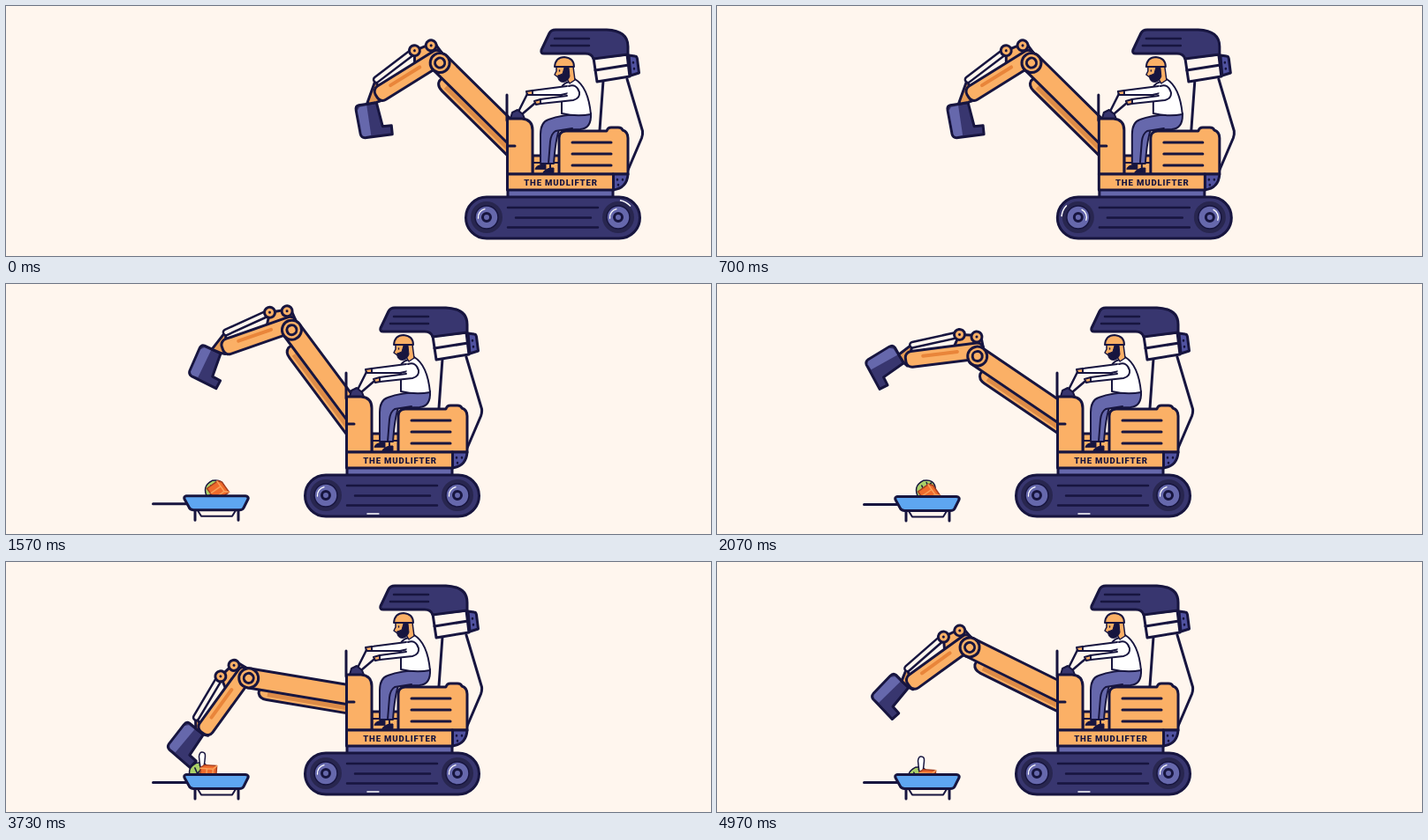
These frames come from a looping animation (798x284 px, 5130 ms). An HTML page:

```html
<!DOCTYPE html>
<html lang="en">
<head>
<meta charset="utf-8">
<title>Digger at the stove</title>
<style>
html, body { margin: 0; width: 100%; height: 100%; overflow: hidden; background: #fff6ee; }
svg { display: block; width: 798px; height: 284px; }
.o { fill: #fbb066; } .n { fill: #38366f; } .p { fill: #6668ac; } .w { fill: #fff6ee; }
.d { fill: #17153f; } .f { fill: none; } .m { fill: #5052a0; }
text { font: 900 9.6px Roboto, "Liberation Sans", sans-serif; letter-spacing: .85px; }
</style>
</head>
<body>
<svg viewBox="0 0 798 284" stroke="#17153f" stroke-width="3" stroke-linecap="round" stroke-linejoin="round">
  <g id="digger">
    <!-- boom, with its tip at the origin -->
    <g id="boom">
      <path fill="#fbb066" d="M14 10V15Q16 21 24 21H132V8H14Z"/>
      <path d="M24 15H132" stroke="#dd8b47" stroke-width="5" stroke-linecap="butt"/>
      <path class="o" d="M0 -11H132V11H0A11 11 0 0 1 0 -11Z"/>
    </g>
    <g id="bucket">
      <g transform="translate(-1.6 -2.5)">
        <path class="n" d="M-22 8L-2 5 5 32 15 31 16 41 -15 45Q-19 45 -20 41L-25 14Q-26 9 -22 8Z"/>
        <path class="p" stroke="none" d="M-21 10L-13 8.5 -8 42 -15 43.5Q-18 43 -18.5 41L-23.5 14Z"/>
      </g>
    </g>
    <!-- stick, running along its own x axis -->
    <g id="stick">
      <polygon id="link" fill="#e39a55"/>
      <path class="o" d="M-8 6L-7 20 0 24 17 27 25 14Z"/>
      <path class="f" d="M17 27L71 22" stroke-width="9"/>
      <path class="f" d="M17 27L71 22" stroke="#fff6ee" stroke-width="4"/>
      <rect class="o" x="-8" y="-3" width="89" height="18" rx="7"/>
      <path d="M22 8H61" stroke="#e9853a" stroke-width="4"/>
      <circle class="o" cx="17" cy="27" r="6"/><circle class="d" cx="17" cy="27" r="1.5" stroke="none"/>
      <circle class="o" cx="-2" cy="22" r="6"/><circle class="d" cx="-2" cy="22" r="1.5" stroke="none"/>
      <circle class="o" r="11"/><circle class="o" r="5.5"/>
    </g>

    <!-- cab and canopy -->
    <path class="f" d="M494 85L490 141M521 83L538.5 142Q539 146 537.5 150L520 191"/>
    <path class="w" d="M483 59L521 55 524 80 487 86Z"/>
    <path class="f" d="M485 73L523 67"/>
    <path class="m" d="M523 56L530 57Q532 57 532.5 60L534.5 76 525 79Z"/>
    <path class="n" d="M424 50L433 31Q435 27 440 27H498Q522 28 522 46V55L483 60Q481 54 474 54H427Q423 54 424 50Z"/>
    <path class="f" d="M439 37H478M435 45H478" stroke-width="2.5"/>
    <path class="f" d="M528 64V64.5M529 71V71.5" stroke-width="2.5"/>

    <path class="o" d="M414 170H446V191H414Z"/>
    <path class="f" d="M414 178H445" stroke-width="2"/>
    <path class="o" d="M444 191V150Q444 142 452 142H498Q499 138 503 138H511Q515 138 516 141Q522 143 522 150V191Z"/>
    <path class="f" d="M459 155H503M459 168H503M459 181H503"/>

    <!-- operator -->
    <g stroke-width="2">
      <path class="p" d="M480 122Q481 139 468 140L444 141Q440 152 438 179H429Q428 154 433 137L449 125Z"/>
      <path class="p" d="M472 123Q447 123 432 129Q423 132 423 146L423 179H432L434 154Q435 145 440 142L459 139"/>
      <path class="o" d="M425 179V183M434 179V185"/>
      <path class="d" d="M417 185Q418 181 426 180H429V185ZM426 189Q428 185 435 184H438V189Z" stroke-width="1"/>
      <path fill="#fff" d="M447 92Q450 87 456 86L462 83Q477 92 480 123Q464 126 447 122Z"/>
      <path fill="#fff" d="M453 91L414 96V101L446 101 455 99"/>
      <path fill="#fff" d="M455 91Q464 88 467 98Q468 105 460 107L423 111V106L453 102"/>
      <path class="o" d="M414 96L407 97 408 101 414 101ZM423 106L416 108 418 112 423 111Z"/>
      <path class="f" d="M408 100L397 122M416 111L402 123" stroke-width="2.5"/>
      <path class="o" d="M441 69V74L439 78 443 81H452L456 88 462 84 460 69Z" stroke-width="1.5"/>
      <path class="d" d="M443 79L448 77 450 70H455L456 80Q453 88 446 86Q442 84 443 79Z" stroke-width="1"/>
      <path class="o" d="M439 69Q440 58 450 58Q461 59 461 69Z"/>
      <path class="f" d="M444.5 73V74" stroke-width="1.5"/>
    </g>
    <path class="n" d="M389 128L391 121 397 118 403 123 405 128Z" stroke-width="2"/>
    <path class="o" d="M385.5 191V128H402Q414 129 414 141V191Z"/>
    <path class="f" d="M385 101V130M386 159H394"/>

    <!-- chassis -->
    <path class="m" d="M505 191H522Q521 207 505 209Z"/>
    <path class="f" d="M510 197V197.5M516 197V197.5M511 203V203.5" stroke-width="2.5"/>
    <rect class="p" x="386" y="208" width="119" height="10"/>
    <rect class="o" x="385.5" y="191" width="120" height="18"/>
    <text class="d" x="446" y="203.8" text-anchor="middle" stroke="none">THE MUDLIFTER</text>
    <rect class="n" x="338.5" y="217" width="197" height="47" rx="23.5"/>
    <path class="f" d="M386 229H488M395 240.5H480M386 251.5H488" stroke-width="2.5"/>
    <g id="wheels"></g>
    <path id="glint" class="f" stroke="#fff" stroke-width="1.5" stroke-linecap="butt"
      d="M511 220.5H362A20.3 20.3 0 0 0 362 261H511A20.3 20.3 0 0 0 511 220.5Z"/>
  </g>

  <g id="leaf" stroke-width="1.5">
    <path fill="#a9d068" d="M-10 8Q-14 -7 0 -10Q13 -9 11 3Q7 13 -10 8Z"/>
    <path class="f" d="M-9 7L8 -5M-2 2L-3 -5M-2 2L5 4M4 -2L3 -7"/>
  </g>
  <g id="white" stroke-width="1.5">
    <path fill="#fff" d="M-2 8Q-3 2 -3.5 -4Q-3 -9 0 -9Q4 -9 3.5 -4Q3 2 2 8Z"/>
  </g>
  <g id="fish" stroke="#a63f20" stroke-width="1.5">
    <path fill="#ef6b2c" d="M-9 -6L-5 -9H9V6L5 9H-9Z"/>
    <path class="f" d="M-9 -5H5L9 -9M5 -5V8M-2 -5V8" stroke="#f9a15b"/>
  </g>

  <g id="pan">
    <path class="f" d="M166.5 250.5H204M214 259V269M263 259V269"/>
    <path class="w" d="M217 258L221 264.5H256L260 258" stroke-width="2"/>
    <path fill="#5ea6f1" d="M204 241.5H271Q275 242 274 245L269 255Q268 257.5 264 257.5H212Q208 257 207 254L202 245Q201 242 204 241.5Z"/>
  </g>
</svg>
<script>
const LOOP = 5130, RAD = Math.PI / 180;
const el = id => document.getElementById(id);
const put = (id, x, y, r = 0) => el(id).setAttribute('transform', `translate(${x} ${y}) rotate(${r})`);
const clamp = p => Math.max(0, Math.min(1, p));
const ease = (t, a, b) => (1 - Math.cos(Math.PI * clamp((t - a) / (b - a)))) / 2;
const mix = (a, b, p) => a + (b - a) * p;

// Eased value along [time, value] keys
function track(t, keys) {
  let v = keys[0][1];
  for (let i = 1; i < keys.length; i++)
    if (t >= keys[i - 1][0]) v = mix(keys[i - 1][1], keys[i][1], ease(t, keys[i - 1][0], keys[i][0]));
  return v;
}

// Point (x, y) turned by r degrees and moved to (ox, oy)
function turn(x, y, r, ox, oy) {
  const c = Math.cos(r * RAD), s = Math.sin(r * RAD);
  return [ox + x * c - y * s, oy + x * s + y * c];
}

const boomKeys = [[1080, 44.7], [1610, 53.5], [2620, 9], [3330, 26.5], [3880, 6], [3950, 6], [4800, 26.4]];
const stickKeys = [[1080, 32], [2050, 7], [2600, 55], [3270, 40], [3780, 54.5], [3950, 54.5], [4800, 36]];
const bucketKeys = [[1080, 0], [2070, 69], [2600, 15], [3030, -28], [3300, -28], [3760, 49], [4800, 54]];
const panKeys = [[780, 60], [1045, -10.5], [1290, 6], [1500, -1], [1700, 0]];

// Each food: first drop, place in the bucket and place in the pan, with angles
const foods = {
  leaf: { x: 236, y: [[780, 310], [1070, 223], [1260, 198], [1570, 233]], r: [[1070, 0], [1570, -15]],
    hold: [9, 11], pan: [227, 243] },
  white: { x: 231, y: [[0, 252]], r: [[2600, -10], [3030, 40], [3400, 40], [3730, 0]],
    hold: [-7, 18], pan: [231, 230] },
  fish: { x: 240, y: [[780, 300], [1070, 204], [1290, 170], [1620, 238]], r: [[1070, 30], [1620, 55], [2600, 55], [3030, 25], [3400, 25], [3730, 4]],
    hold: [8, 19], pan: [238, 245] }
};

el('wheels').innerHTML = [362, 511].map(x => `<g transform="translate(${x} 240)">
  <circle r="18" fill="#28264f" stroke="none"/><circle r="13" class="p" stroke-width="1.5"/>
  <path class="f spin" d="M-9.5 1A9.5 9.5 0 0 1 -2 -9.3" stroke="#fff" stroke-width="1.3"/>
  <circle r="4.5" class="p"/></g>`).join('');
const spins = document.querySelectorAll('.spin');
const glint = el('glint'), around = glint.getTotalLength();
glint.setAttribute('stroke-dasharray', `14 ${around - 14}`);

function draw(t) {
  const roll = clamp(t / 1060);
  put('digger', 182 * (1 - ease(t, 0, 1060)), 0);
  spins.forEach(s => s.setAttribute('transform', `rotate(${-360 * roll})`));
  glint.setAttribute('stroke-dashoffset', 17 - 273 * roll);

  const boom = track(t, boomKeys), s = track(t, stickKeys), b = track(t, bucketKeys);
  const [ax, ay] = turn(-125, 0, boom, 398, 152.5);
  const [px, py] = turn(80.5, 0, 180 - s, ax, ay);
  put('boom', ax, ay, boom);
  put('stick', ax, ay, 180 - s);
  put('bucket', px, py, b);
  const joint = (x, y) => turn(x, y, b + s - 32, 80.5, 0);
  el('link').setAttribute('points', `71,23 80,-1 ${joint(4, 0)} ${joint(14.5, 4)}`);

  put('pan', 0, track(t, panKeys));
  const held = ease(t, 2560, 2720) - ease(t, 3430, 3740);
  const slide = 1 - ease(t, 3730, 3860);
  const hop = 50 * Math.sin(Math.PI * clamp((t - 4800) / 170));
  const late = t > 3200;
  for (const [id, f] of Object.entries(foods)) {
    const x = late ? f.pan[0] - 9 * slide : f.x;
    const y = late ? f.pan[1] - 5 * slide - hop : track(t, f.y);
    const [hx, hy] = turn(...f.hold, b, px, py);
    put(id, mix(x, hx, held), mix(y, hy, held), track(t, f.r));
    el(id).style.display = t < 780 || (id === 'white' && t < 2560) ? 'none' : '';
  }
}

const start = performance.now();
function tick() {
  draw((performance.now() - start) % LOOP);
  requestAnimationFrame(tick);
}
tick();
</script>
</body>
</html>
```
